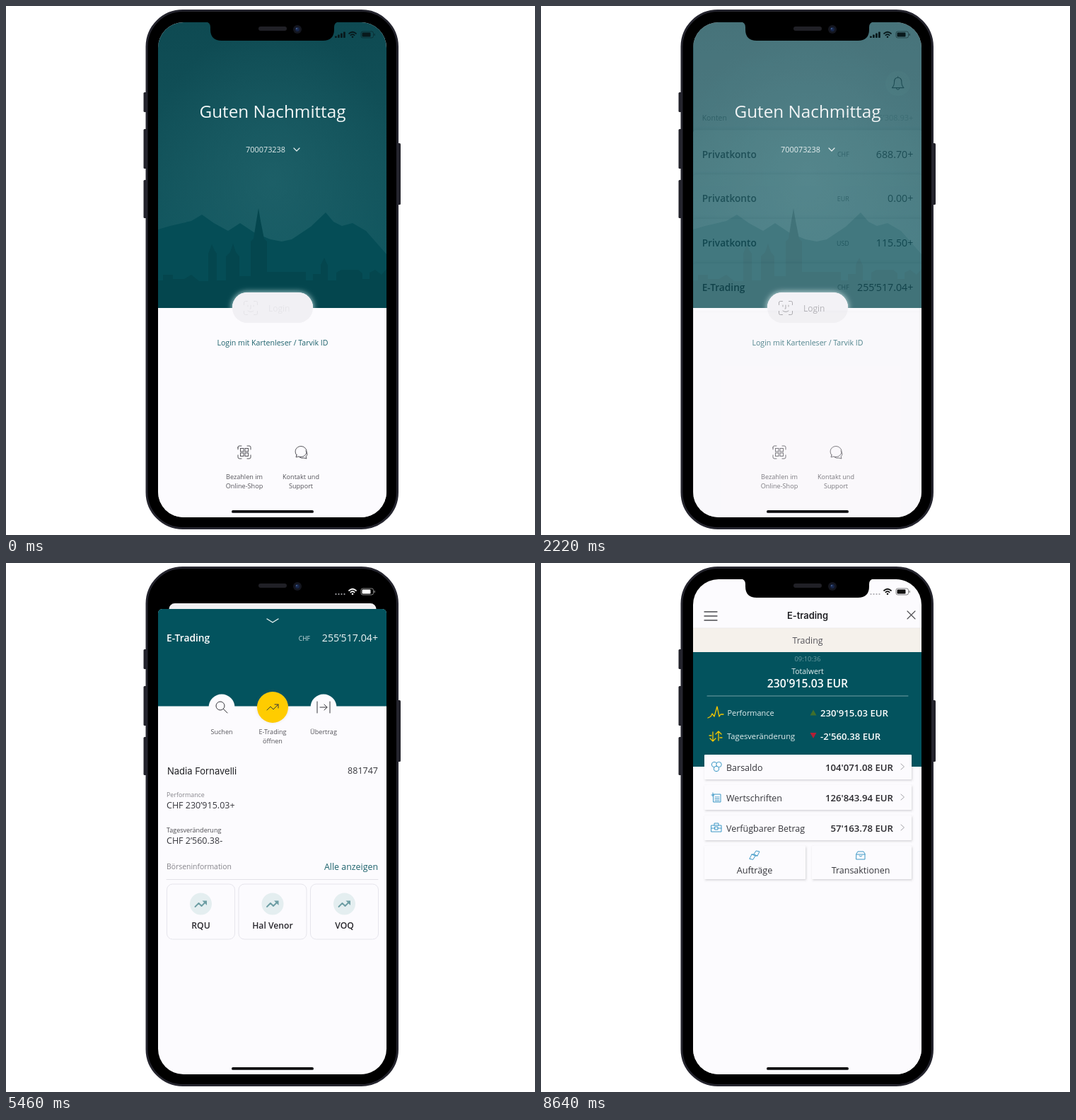
An HTML page that plays this animation: 748 px wide and 748 px high, repeating every 8.7 s.

```html
<!DOCTYPE html>
<html lang="de">
<head>
<meta charset="utf-8">
<title>Mobile Banking</title>
<style>
  html, body { margin: 0; width: 100%; height: 100%; overflow: hidden; background: #fff; }
  svg { display: block; width: 100vw; height: 100vh; }
  text { font-family: "Open Sans", "Noto Sans", sans-serif; }
  .system { font-family: Inter, Roboto, sans-serif; }
  .line { fill: none; stroke-linecap: round; stroke-linejoin: round; }
</style>
</head>
<body>
<svg id="stage" viewBox="0 0 748 748" xmlns="http://www.w3.org/2000/svg"></svg>
<script>
const LOOP = 8700, STEP = 60;
const SHEET_START = 3039, PORTFOLIO_START = 6730;
const TEAL = '#03535e', INK = '#36363c', GREY = '#85848a', PAPER = '#fcfbfe';

const attrs = o => Object.entries(o).map(([k, v]) => ` ${k}="${v}"`).join('');
const rect = (x, y, width, height, fill, more = {}) =>
  `<rect${attrs({ x, y, width, height, fill, ...more })}/>`;
const circle = (cx, cy, r, fill, more = {}) => `<circle${attrs({ cx, cy, r, fill, ...more })}/>`;
const line = (d, stroke = INK, width = 1) =>
  `<path class="line"${attrs({ d, stroke, 'stroke-width': width })}/>`;
const text = (x, y, str, size, fill = INK, more = {}) =>
  `<text${attrs({ x, y, 'font-size': size, fill, ...more })}>${str}</text>`;
const group = (content, more = {}) => `<g${attrs(more)}>${content}</g>`;
const at = (x, y, content) => group(content, { transform: `translate(${x} ${y})` });

const MID = { 'text-anchor': 'middle' }, END = { 'text-anchor': 'end' };
const BOLD = { 'font-weight': 600 };

const brackets = (r, color) =>
  line(`M${-r} ${3 - r}V${2 - r}Q${-r} ${-r} ${2 - r} ${-r}H${5 - r}M${r - 5} ${-r}H${r - 2}Q${r} ${-r} ${r} ${2 - r}V${5 - r}` +
    `M${r} ${r - 5}V${r - 2}Q${r} ${r} ${r - 2} ${r}H${r - 5}M${5 - r} ${r}H${2 - r}Q${-r} ${r} ${-r} ${r - 2}V${r - 5}M${-r} ${2 - r}V${5 - r}`, color);

function loginScreen() {
  const mountains = 'M215 316L232 311L262 304L277 295L294 307L314 318L331 307L352 321L374 330L390 333L404 330L431 312L452 292L463 305L475 311L490 307L509 318L538 351V427H215Z';
  const city = 'M215 388H222V380H236V386H252L262 380L273 389H286V350L288 345L291 337L295 346L298 350V388H311V354L317 348L321 336L325 348L330 354V382H346V333L350 329L354 304L357 286L360 304L365 329L369 333V376H424V388H434V379H445V366L450 356L455 367V388H467V377L474 373H498L504 378V386H514V377L522 373L531 380L538 372V427H215Z';
  const face = brackets(9.5, '#929196') +
    line('M-4-4V-2M4-4V-2M0-4V1H-1M-4 4Q0 7 4 4', '#929196');
  const qr = brackets(9, '#55545a') + [[-5.5, -5.5], [1, -5.5], [-5.5, 1], [1, 1]]
    .map(([x, y]) => rect(x, y, 4.5, 4.5, 'none', { stroke: '#55545a' })).join('');
  const chat = line('M-6 4L-7 7L-3 6A8 7.5 0 1 0 -6 4ZM7-2Q11 3 7 6L8 9L4 8Q1 9-2 7', '#55545a');
  const small = (x, y, s) => text(x, y, s, 9.1, '#55545a', MID);
  return rect(215, 23, 323, 404, 'url(#sky)') + rect(215, 23, 323, 404, 'url(#haze)') +
    `<path d="${mountains}" fill="#054d56"/><path d="${city}" fill="#04464e"/>` +
    rect(215, 427, 323, 296, PAPER) +
    text(377, 158, 'Guten Nachmittag', 24.3, '#f2f7f7', MID) +
    text(339, 207, '700073238', 10.9, '#e2eded') +
    at(411, 203, line('M-4-2L0 2L4-2', '#e2eded', 1.2)) +
    group(rect(320, 405, 114, 43, '#fff', { rx: 21, filter: 'url(#glow)' }), { 'clip-path': 'url(#upper)' }) +
    rect(320, 405, 114, 43, '#f1f0f4', { rx: 21 }) +
    group(at(346, 427, face) + text(371, 432, 'Login', 12, '#9d9ca2'), { id: 'loginLabel' }) +
    text(377, 480, 'Login mit Kartenleser / Tarvik ID', 10.6, '#1d626c', MID) +
    at(337, 631, qr) + at(417, 631, chat) +
    small(337, 669, 'Bezahlen im') + small(337, 682, 'Online-Shop') +
    small(417, 669, 'Kontakt und') + small(417, 682, 'Support');
}

function accountsScreen() {
  const row = ([name, currency, amount], i) => {
    const y = 182 + 61 * i, last = i === 3;
    return rect(220, y, 314, last ? 65 : 66, '#fbfafc', { rx: 4, filter: 'url(#lift)' }) +
      group(text(232, y + 38, name, 13.3, INK, BOLD) +
        text(434, y + 36.5, currency, 8.6, '#77767c', END) +
        text(522, y + 38, amount, 13.8, INK, END), last ? { id: 'tappedRow' } : {});
  };
  const rows = [['Privatkonto', 'CHF', '688.70+'], ['Privatkonto', 'EUR', '0.00+'],
    ['Privatkonto', 'USD', '115.50+'], ['E-Trading', 'CHF', '255’517.04+']];
  return rect(220, 34, 314, 690, '#f1f0f3', { rx: 9 }) +
    circle(501, 118, 17, '#fbfafc') +
    at(501, 118, line('M-8 6Q-5 3-5-2Q-5-8 0-8Q5-8 5-2Q5 3 8 6ZM-2 7Q0 10 2 7M0-8V-9.5', '#4c4b50', 1.1)) +
    text(232, 168.5, 'Konten', 10.2, GREY) + text(434, 168, 'CHF', 8.6, GREY, END) +
    text(522, 168.5, '256’308.93+', 10.7, '#bdbcc1', END) + rows.map(row).join('');
}

function tradingSheet() {
  const lens = circle(-2, -2, 6, 'none', { stroke: INK }) + line('M2.5 2.5L8 8');
  const transfer = line('M-9-8V8M9-8V8M-5 0H5M1-4L5 0L1 4');
  const trend = line('M-8 4L-3-1L1 3L8-4M3-4H8V1');
  const label = (x, y, s) => text(x, y, s, 9.1, '#55545a', MID);
  const tile = (name, i) => {
    const x = 227.5 + 101.5 * i, mid = x + 48;
    return rect(x, 454, 96, 78, PAPER, { rx: 8, stroke: '#e6e5ec' }) + circle(mid, 482, 15.5, '#e4eef0') +
      at(mid, 482, line('M-8 4L-3-1L1 3L7-3', '#6c9da3', 1.8) + '<path d="M2-4.5H8.5V2Z" fill="#6c9da3"/>') +
      text(mid, 517, name, 12.2, '#29282d', { ...MID, ...BOLD });
  };
  const actions = circle(305, 204, 18.5, PAPER) + at(305, 204, lens) +
    circle(377, 204, 22, '#ffcc00', { id: 'tradeButton', filter: 'url(#lift)' }) + at(377, 204, trend) +
    circle(449, 204, 18.5, PAPER) + at(449, 204, transfer) +
    label(305, 242, 'Suchen') + label(377, 242, 'E-Trading') + label(377, 255, 'öffnen') + label(449, 242, 'Übertrag');
  return rect(215, 65, 323, 680, PAPER, { rx: 6 }) +
    `<path d="M215 202.5V71Q215 65 221 65H532Q538 65 538 71V202.5Z" fill="${TEAL}"/>` +
    at(377, 82, line('M-8-3L0 2L8-3', '#e8f2f2', 1.4)) +
    text(227, 110.5, 'E-Trading', 13.8, '#fff', BOLD) + text(430, 110, 'CHF', 8.6, '#cfe0e2', END) +
    text(526, 110.5, '255’517.04+', 14.2, '#eef5f5', END) +
    group(actions, { id: 'actions' }) +
    text(228, 299, 'Nadia Fornavelli', 13, '#202024', { class: 'system' }) +
    text(526, 297.5, '881747', 12.5, INK, END) +
    text(227, 331, 'Performance', 8.9, GREY) + text(227, 347, 'CHF 230’915.03+', 12.5) +
    text(227, 380.5, 'Tagesveränderung', 9, '#4c4b50') + text(227, 396.5, 'CHF 2’560.38-', 12.5) +
    text(227, 432.5, 'Börseninformation', 10.4, GREY) +
    text(526, 433.5, 'Alle anzeigen', 12.4, '#1d626c', END) +
    line('M227 447.5H526', '#e3e2e8') + ['RQU', 'Hal Venor', 'VOQ'].map(tile).join('');
}

const VALUES = {
  clock: ['08:54:58', '09:10:36'],
  total: ["230'809.26 EUR", "230'915.03 EUR"],
  gain: ["230'809.26 EUR", "230'915.03 EUR"],
  dayChange: ["-2'632.97 EUR", "-2'560.38 EUR"],
  cash: ["104'056.76 EUR", "104'071.08 EUR"],
  securities: ["126'752.50 EUR", "126'843.94 EUR"],
  available: ["57'136.28 EUR", "57'163.78 EUR"]
};

function portfolioScreen() {
  const blue = '#3d98c6', gold = '#f5c800';
  const coins = [[-3, -3], [3.5, -3], [0, 3]].map(([x, y]) => circle(x, y, 3.7, '#fff', { stroke: blue })).join('');
  const paper = line('M-4-4H6V7H-4ZM-2 0H4M-2 2.5H4M-2 5H4M-7-3H-3M-5-6V-1', blue);
  const briefcase = line('M-7-3H7V6H-7ZM-3-3V-6H3V-3M-7 1H-2M2 1H7M-2-1H2V3H-2Z', blue);
  const orders = line('M-7 5L-4-1H-1L2-6L7-5L4 1H1L-2 6ZM-4-1L1 1M-1-1L4 1', blue);
  const tray = line('M-6-3L-4-6H4L6-3V5H-6ZM-6-2H6M-2 0Q0 2 2 0', blue);
  const card = (x, y, w, h) => rect(x, y, w, h, PAPER, { rx: 1, filter: 'url(#cardShadow)' });
  const row = (y, icon, name, id) => card(231, y, 293, 35) + at(248, y + 17, icon) +
    text(262, y + 22.5, name, 12.5) + text(498, y + 22.5, '', 13.2, '#29282d', { ...END, ...BOLD, id }) +
    line(`M509 ${y + 13}L513.5 ${y + 17}L509 ${y + 21}`, '#a5a4aa');
  return rect(215, 23, 323, 720, PAPER) +
    line('M231 69H249M231 75H249M231 81H249', '#4a494e', 1.3) +
    line('M518 68L529 79M529 68L518 79', '#4a494e', 1.1) +
    text(377, 79, 'E-trading', 12.9, '#202024', { ...MID, ...BOLD, class: 'system' }) +
    rect(215, 92, 323, 34, '#f5f1eb') + line('M215 92H538', '#e9e6e5', .7) +
    text(377, 113.5, 'Trading', 12.4, '#55545a', MID) +
    rect(215, 126, 323, 162, TEAL) +
    text(377, 139, '', 9.4, '#6e9ca2', { ...MID, id: 'clock' }) +
    text(377, 156.5, 'Totalwert', 10.5, '#e5efef', MID) +
    text(377, 176, '', 15.7, '#fff', { ...MID, ...BOLD, id: 'total' }) +
    line('M235 188H519', '#7fa8ad', .9) +
    at(247, 212, line('M-11 7L-7 5L-5 1L-2 5L2-9L5 5L7 2L11 2', gold, 1.3)) +
    text(263.5, 216, 'Performance', 10.9, '#e5efef') + '<path d="M380.5 215.5L385 207.5L389.5 215.5Z" fill="#416f2c"/>' +
    text(395, 216.5, '', 13.2, '#fff', { ...BOLD, id: 'gain' }) +
    at(247, 245, line('M-4-6V7M-8 3L-4 7L0 3M4 6V-7M0-3L4-7L8-3M-9-1H-6M6 2H9', gold, 1.3)) +
    text(263, 249, 'Tagesveränderung', 11.2, '#e5efef') + '<path d="M380.5 240L389.5 240L385 248Z" fill="#b21f36"/>' +
    text(395, 249.5, '', 13.2, '#fff', { ...BOLD, id: 'dayChange' }) +
    row(271, coins, 'Barsaldo', 'cash') + row(314, paper, 'Wertschriften', 'securities') +
    row(357, briefcase, 'Verfügbarer Betrag', 'available') +
    card(231, 400, 143, 47) + card(383, 400, 141, 47) + at(302, 413, orders) + at(452, 414, tray) +
    text(302, 439, 'Aufträge', 12.7, INK, MID) + text(452, 439, 'Transaktionen', 12.5, INK, MID);
}

function statusBar() {
  const bars = [0, 1, 2, 3].map(i => rect(465 + 4 * i, 42.5 - 2 * i, 2.8, 2.5 + 2 * i, 'currentColor', { rx: .7 })).join('');
  const dots = [0, 1, 2, 3].map(i => circle(466.5 + 4 * i, 44, 1.1, '#a9a8ae')).join('');
  return group(bars, { id: 'bars' }) + group(dots, { id: 'dots' }) +
    line('M485 39Q490 34.5 495 39M487.3 41.3Q490 39 492.7 41.3', 'currentColor', 1.7) +
    circle(490, 43.7, 1.3, 'currentColor') +
    rect(502, 36, 17.5, 9, 'none', { rx: 2.5, stroke: 'currentColor', 'stroke-opacity': .5 }) +
    rect(503.5, 37.5, 12, 6, 'currentColor', { rx: 1.2 }) + rect(520.5, 39, 1.3, 3, 'currentColor', { opacity: .5 });
}

const shadow = (id, dx, dy, blur, color, opacity) =>
  `<filter id="${id}" x="-20%" y="-40%" width="140%" height="180%"><feDropShadow${attrs({ dx, dy, stdDeviation: blur, 'flood-color': color, 'flood-opacity': opacity })}/></filter>`;
const SCREEN = { x: 215, y: 23, width: 323, height: 700, rx: 36 };
const side = (x, y, h) => rect(x, y, 4.5, h, '#22222a', { rx: 1.5 });

document.getElementById('stage').innerHTML = `<defs>
  <linearGradient id="sky" x2="0" y2="1"><stop stop-color="#0e4a52"/><stop offset=".5" stop-color="#12535b"/><stop offset="1" stop-color="#115a63"/></linearGradient>
  <radialGradient id="haze" cy=".56" r=".55"><stop stop-color="#21646c" stop-opacity=".7"/><stop offset="1" stop-color="#21646c" stop-opacity="0"/></radialGradient>
  <clipPath id="screenClip"><rect${attrs(SCREEN)}/></clipPath>
  <clipPath id="upper"><rect x="215" y="380" width="323" height="47"/></clipPath>
  ${shadow('glow', 0, 0, 4, '#e8ffff', .9)}${shadow('lift', 0, -1, 2, '#55555f', .2)}${shadow('cardShadow', 1, 1.5, 1.5, '#55555f', .25)}
</defs>` +
  side(194.5, 122, 28) + side(194.5, 174, 56) + side(194.5, 246, 54) + side(553.5, 194, 87) +
  rect(199, 6.5, 354.5, 732, '#000', { rx: 51, stroke: '#25252e', 'stroke-width': 3 }) +
  group(rect(215, 23, 323, 700, '#000') +
    group(accountsScreen(), { id: 'accounts' }) + group(loginScreen(), { id: 'login' }) +
    group(tradingSheet(), { id: 'sheet' }) + group(portfolioScreen(), { id: 'portfolio' }),
    { 'clip-path': 'url(#screenClip)' }) +
  group(statusBar(), { id: 'status' }) +
  '<path d="M282 22Q289 23 289 30V33Q289 49 305 49H448Q464 49 464 33V30Q464 23 471 22Z"/>' +
  rect(357, 29, 40, 6, '#202026', { rx: 3 }) + circle(412, 33, 6, '#14161f') +
  circle(412, 33, 3, '#17264a') + circle(411, 32, 1, '#4a6595') +
  rect(319, 713, 116, 3.8, '#09090c', { rx: 1.9 });

const el = id => document.getElementById(id);
const clamp = v => Math.max(0, Math.min(1, v));
const ramp = (t, from, to) => clamp((t - from) / (to - from));
// Critically damped slide used for both presented screens.
const slide = (t, start) => {
  const x = Math.max(0, t - start) * .014;
  return 1 - (1 + x) * Math.exp(-x);
};
const show = (id, visible) => el(id).setAttribute('display', visible ? 'inline' : 'none');
const move = (id, y) => el(id).setAttribute('transform', `translate(0 ${y})`);
const mix = (a, b, k) => `rgb(${a.map((v, i) => Math.round(v + (b[i] - v) * k))})`;

function render(t) {
  const loginFade = 1 - ramp(t, 2160, 2400);
  const sheetIn = slide(t, SHEET_START), portfolioIn = slide(t, PORTFOLIO_START);

  show('login', loginFade > 0);
  el('login').setAttribute('opacity', loginFade);
  el('loginLabel').setAttribute('opacity', .13 + .87 * ramp(t, 0, 480));

  const scale = (1 - .093 * sheetIn) / .971;
  el('accounts').setAttribute('transform', `translate(377 ${23 + 34 * sheetIn}) scale(${scale}) translate(-377 -34)`);
  el('tappedRow').setAttribute('opacity', 1 - .5 * ramp(t, 2760, 2940));

  show('sheet', t >= SHEET_START);
  move('sheet', 658 * (1 - sheetIn));
  move('actions', 8 * (1 - sheetIn));
  el('tradeButton').setAttribute('fill', mix([240, 239, 243], [255, 204, 0], ramp(sheetIn, .35, .8)));

  show('portfolio', t >= PORTFOLIO_START);
  move('portfolio', 700 * (1 - portfolioIn));
  const refreshed = t >= 7800 ? 1 : 0;
  for (const id in VALUES) el(id).textContent = VALUES[id][refreshed];

  const onBlack = sheetIn > .5 && portfolioIn < .96;
  el('status').setAttribute('color', onBlack ? '#fff' : loginFade > .5 ? '#08191c' : '#111');
  show('bars', loginFade > .5);
  show('dots', loginFade <= .5);
}

const begin = performance.now();
function tick() {
  const t = (performance.now() - begin) % LOOP;
  render(Math.floor(t / STEP) * STEP);
  requestAnimationFrame(tick);
}
tick();
</script>
</body>
</html>
```
